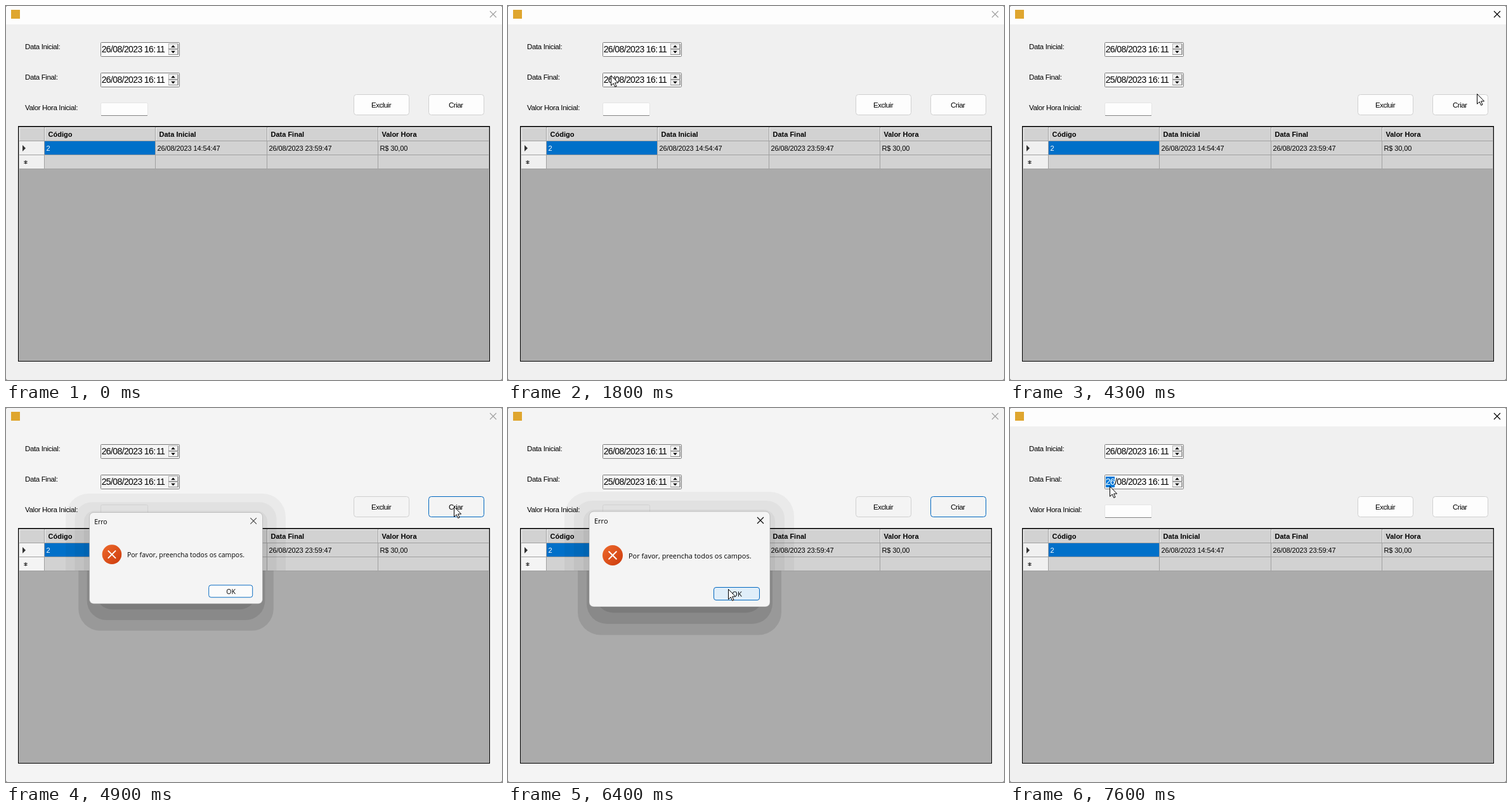
An HTML page for the animation above (8000 ms loop, 782 by 589 pixels).

```html
<!DOCTYPE html>
<html lang="pt">
<head>
<meta charset="utf-8">
<title>Cadastro</title>
<style>
html, body { margin: 0; width: 100%; height: 100%; overflow: hidden; background: #777; }
svg { display: block; width: 782px; height: 589px; --paper: #fdfdfd; --form: #f0f0f0; }
svg.modal { --paper: #f4f4f4; --form: #f4f4f4; }
text { font-family: "Liberation Sans", Arial, sans-serif; fill: #000; white-space: pre; }
.label { font-size: 11.5px; letter-spacing: -.36px; }
.btn { font-size: 11.5px; letter-spacing: -.5px; }
.date { font-size: 14px; letter-spacing: -.62px; }
.head { font-size: 11px; font-weight: bold; }
.cell { font-size: 11px; letter-spacing: -.1px; }
.msg { font-family: "Open Sans", "Noto Sans", sans-serif; font-size: 11px; }
.paper { fill: var(--paper); }
.form { fill: var(--form); }
</style>
</head>
<body>
<svg id="stage" viewBox="0 0 782 589"></svg>
<script>
const stage = document.getElementById("stage");
const LOOP = 8000;
const STEP = 100;

const rect = (x, y, w, h, attrs) => `<rect x="${x}" y="${y}" width="${w}" height="${h}" ${attrs}/>`;
const text = (x, y, cls, str, attrs = "") => `<text x="${x}" y="${y}" class="${cls}" ${attrs}>${str}</text>`;
const path = (d, attrs = "") => `<path d="${d}" ${attrs}/>`;
const repeat = (n, fn) => Array.from({ length: n }, (_, i) => fn(i)).join("");
const cross = (cx, cy, r, attrs) =>
  path(`M${cx - r} ${cy - r}l${2 * r} ${2 * r}M${cx + r} ${cy - r}l${-2 * r} ${2 * r}`, `fill="none" ${attrs}`);

function spinner(y) {
  return repeat(2, i => {
    const top = y + 2 + 9 * i;
    const dir = i ? -1 : 1;
    return rect(256.5, top + .5, 14, 8, 'class="form" stroke="#b4b4b4"') +
      path(`M256 ${top + 8.5}h15.5v-8`, 'fill="none" stroke="#8c8c8c"') +
      path(`M260.2 ${top + 4.5 + 1.7 * dir}h6.6l-3.3 ${-3.4 * dir}z`);
  });
}

function dateField(y, id) {
  return rect(149.5, y + .5, 124, 22, 'rx="1" class="paper" stroke="#7a7a7a"') +
    rect(151, y + 3, 14, 17, `id="${id}Mark" fill="#0078d7"`) +
    text(150.7, y + 16, "date", `<tspan id="${id}Day">26</tspan>/08/2023 16:<tspan dx="1.5">11</tspan>`) +
    spinner(y);
}

function button(x, id, label, labelX) {
  return rect(x + .5, 139.5, 87, 32, `id="${id}" rx="4"`) + text(labelX, 160, "btn", label);
}

function grid() {
  const titles = ["Código", "Data Inicial", "Data Final", "Valor Hora"];
  const values = ["2", "26/08/2023 14:54:47", "26/08/2023 23:59:47", "R$ 30,00"];
  const colX = i => Math.round(60 + 175.3 * i);
  const rows = repeat(3, i => rect(21, 212 + 22 * i, 741, 1, 'fill="#a0a0a0"'));
  const lines = repeat(5, i => rect(colX(i), 191, 1, 66, 'fill="#a0a0a0"'));
  const cells = repeat(4, i =>
    rect(colX(i) + 1, 192, 1, 20, 'fill="#f4f4f4"') +
    text(colX(i) + 6.5, 206, "head", titles[i]) +
    text(colX(i) + 3.5, 228, "cell", values[i], i ? "" : 'style="fill:#fff"'));
  return rect(19.5, 189.5, 743, 370, 'fill="#ababab" stroke="#000"') +
    rect(21, 191, 741, 66, 'fill="#d2d2d2"') +
    rect(20, 190, 742, 1, 'fill="#555"') +
    rect(21, 191, 741, 1, 'fill="#f4f4f4"') +
    rect(21, 191, 1, 21, 'fill="#f4f4f4"') +
    rect(21, 213, 39, 43, 'class="form"') +
    rect(61, 213, 174, 21, 'fill="#0070c9"') + rows + lines + cells +
    path("M26 219v10l5-5z", 'fill="#333"') +
    path("M31 243v6M28.3 244.5l5.4 3M28.3 247.5l5.4-3", 'stroke="#333" stroke-width="1.3"');
}

// banded shadow: soft above the grid body, stronger over its grey
function shadow() {
  const soft = repeat(3, i =>
    rect(89 + 15 * i, 132 + 14 * i, 362 - 30 * i, 240, `rx="${38 - 10 * i}" opacity=".04"`));
  const strong = repeat(3, i =>
    rect(110 + 14 * i, 150, 321 - 28 * i, 207.5 - 17.5 * i, `rx="${36 - 4 * i}" opacity=".105"`));
  return `<g clip-path="url(#above)"><g class="pop">${soft}</g></g>
    <g clip-path="url(#below)"><g class="pop">${strong}</g></g>`;
}

function dialog() {
  return `<g id="dialog">${shadow()}<g class="pop">` +
    rect(128, 163, 285, 150, 'rx="7" fill="#f4f4f4" stroke="#8a8a8a" stroke-opacity=".55" stroke-width=".8"') +
    text(136, 182, "msg", "Erro") +
    cross(398, 177, 5, 'id="dialogClose" stroke-width="1.1"') +
    `<circle cx="165" cy="232" r="16" fill="url(#alert)"/>` +
    cross(165, 232, 5.8, 'stroke="#fff" stroke-width="2" stroke-linecap="round"') +
    text(190, 237, "msg", "Por favor, preencha todos os campos.") +
    rect(324.5, 282.5, 72, 20, 'id="ok" rx="3.5" stroke="#0067c0"') +
    text(361, 297, "msg", "OK", 'text-anchor="middle"') + `</g></g>`;
}

stage.innerHTML = `<defs>
  <clipPath id="above">${rect(0, 0, 782, 256, "")}</clipPath>
  <clipPath id="below">${rect(0, 256, 782, 333, "")}</clipPath>
  <clipPath id="win">${rect(0, 0, 782, 589, 'rx="3"')}</clipPath>
  <linearGradient id="alert" x1="0" y1="0" x2="1" y2="1">
    <stop offset="0" stop-color="#ee6a2c"/><stop offset="1" stop-color="#cc3a0c"/>
  </linearGradient></defs>
  <g clip-path="url(#win)">` +
  rect(0, 0, 782, 589, 'class="form"') + rect(0, 0, 782, 29, 'class="paper"') + `</g>` +
  rect(8, 6, 14, 14, 'fill="#dfa62f"') +
  cross(768, 13, 5, 'id="close" stroke-width="1.2"') +
  ["Data Inicial:", "Data Final:", "Valor Hora Inicial:"].map((s, i) => text(30, 68 + 48 * i, "label", s)).join("") +
  dateField(57, "start") + dateField(105, "end") +
  rect(149.5, 152.5, 74, 20, 'rx="2" class="paper" stroke="#e4e4e4"') +
  rect(150, 172, 73, 1, 'fill="#868686"') +
  button(548, "remove", "Excluir", 576) + button(666, "create", "Criar", 698) +
  grid() + dialog() +
  path("M.5 .5V16.3L4.2 12.9L6.7 18.4L9 17.4L6.6 12H11.6Z", 'id="cursor" fill="#fff" stroke="#000"');

const el = id => document.getElementById(id);
const set = (node, attrs) => { for (const k in attrs) node.setAttribute(k, attrs[k]); };
const show = (id, on) => set(el(id), { visibility: on ? "visible" : "hidden" });
const between = (t, a, b) => t >= a && t < b;
const pops = stage.querySelectorAll(".pop");

// where the pointer goes, in order
const entry = { x: 600, y: 174 };
const glide = (start, time, x, y) => ({ start, time, x, y });
const glides = [
  glide(500, 500, 226, 47),
  glide(1000, 300, 349, 112),
  glide(1300, 300, 169, 106),
  glide(1700, 100, 162, 109),  // end date
  glide(2300, 200, 170, 154),
  glide(2500, 300, 242, 96),
  glide(2800, 300, 258, 118),  // spinner
  glide(3400, 200, 200, 158),  // hourly value
  glide(3700, 200, 380, 65),
  glide(4000, 300, 736, 138),
  glide(4300, 200, 706, 155),  // create
  glide(4900, 600, 330, 261),
  glide(5600, 100, 338, 269),
  glide(5800, 200, 360, 280),
  glide(6100, 100, 347, 285),  // ok
  glide(6600, 400, 234, 146),
  glide(7000, 100, 202, 146),
  glide(7200, 200, 157, 123)   // end date again
];

const ease = p => p * p * (3 - 2 * p);

function pointer(t) {
  let { x, y } = entry;
  for (const g of glides) {
    const p = ease(Math.min(1, Math.max(0, (t - g.start) / g.time)));
    x += (g.x - x) * p;
    y += (g.y - y) * p;
  }
  return { x: Math.round(x), y: Math.round(y) };
}

const inside = (p, x, y, w, h) => between(p.x, x, x + w) && between(p.y, y, y + h);

function paintButton(id, hover, focus, pressed) {
  set(el(id), {
    style: `fill:${pressed ? "#cce4f7" : hover ? "#e0eef9" : "var(--paper)"}`,
    stroke: hover || focus ? "#0067c0" : "#d0d0d0"
  });
}

function draw(ms) {
  const t = Math.floor(ms / STEP) * STEP;
  const pos = pointer(t);
  const present = t >= 500;
  const open = between(t, 4900, 6700);
  const closing = open && t >= 6600;
  const reachable = present && !open;

  set(el("cursor"), { transform: `translate(${pos.x} ${pos.y})` });
  show("cursor", present);

  stage.classList.toggle("modal", open);
  set(el("close"), { stroke: between(t, 2100, 4900) || t >= 6700 ? "#000" : "#a0a0a0" });

  const picked = between(t, 2100, 3700) || t >= 7600;
  show("startMark", false);
  show("endMark", picked);
  el("endDay").textContent = between(t, 3300, 6700) ? "25" : "26";
  el("endDay").style.fill = picked ? "#fff" : "#000";

  paintButton("remove", reachable && inside(pos, 548, 139, 88, 33), false, false);
  paintButton("create", reachable && inside(pos, 666, 139, 88, 33), between(t, 4800, 7600), t === 4800);

  show("dialog", open);
  const scale = t < 5000 || closing ? .958 : 1;
  pops.forEach(g => set(g, { transform: `translate(211 199) scale(${scale}) translate(-211 -199)` }));
  set(el("dialog"), { opacity: closing ? .5 : 1 });
  set(el("dialogClose"), { stroke: t < 5000 ? "#444" : "#000" });
  const okFill = t >= 6500 ? "#cce4f7" : "#e0eef9";
  set(el("ok"), { fill: inside(pos, 324, 282, 73, 21) ? okFill : "#fbfbfb" });
}

const began = performance.now();
function tick() {
  draw((performance.now() - began) % LOOP);
  requestAnimationFrame(tick);
}
tick();
</script>
</body>
</html>
```
